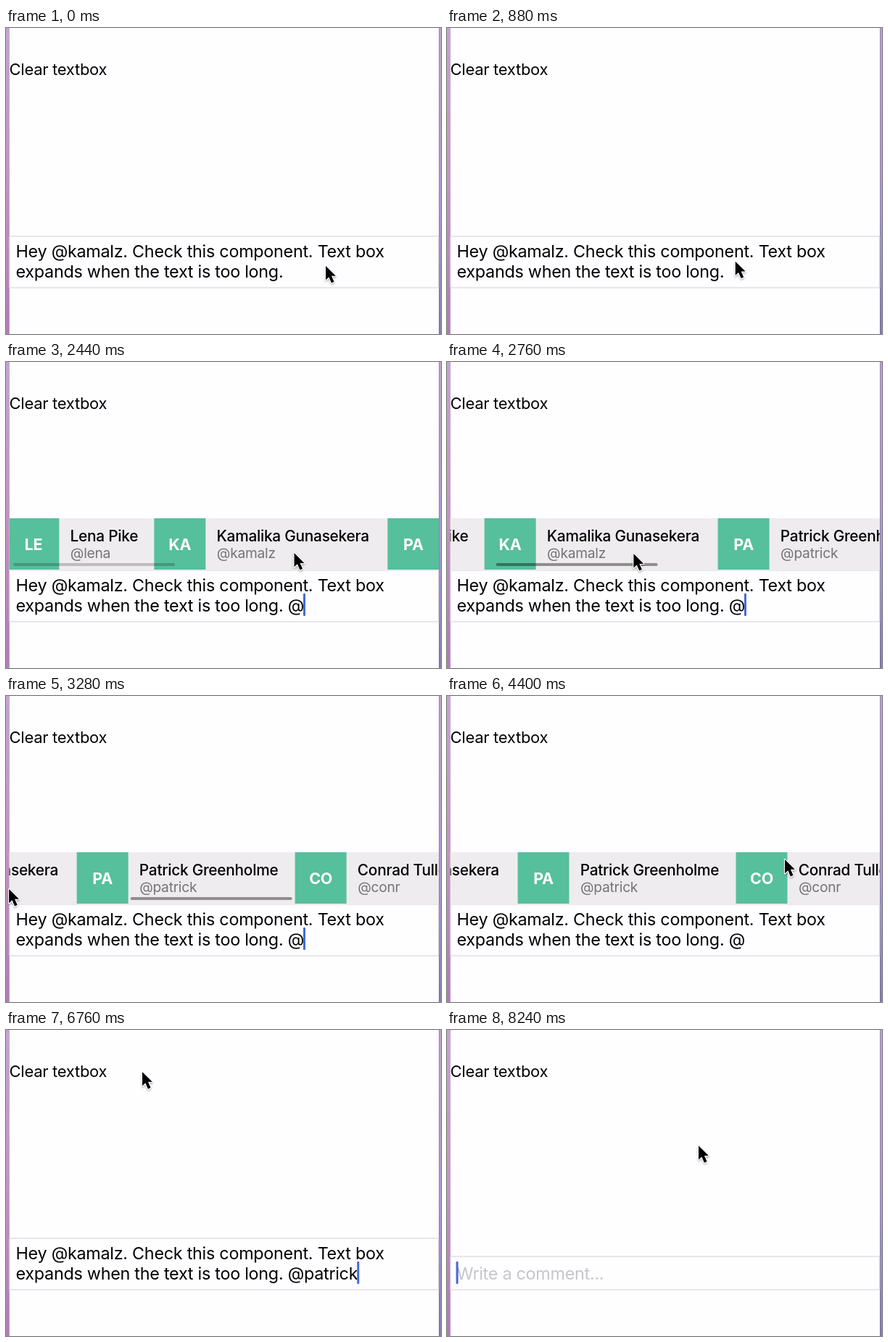
Write an HTML page that moves like this. It is 600 px wide and 423 px high and loops after 8280 ms.

```html
<!DOCTYPE html>
<html lang="en">
<head>
<meta charset="utf-8">
<title>Mention suggestions</title>
<style>
html, body { margin: 0; width: 100%; height: 100%; overflow: hidden; background: #fefdff; }
svg { display: block; width: 600px; height: 423px; }
text { font-family: Inter, "Open Sans", sans-serif; letter-spacing: -.24px; white-space: pre; }
.label { font-size: 21.9px; }
.input { font-size: 23.3px; }
.name { font-size: 20.8px; font-weight: 500; }
.handle { font-size: 19.2px; fill: #747376; }
.initials { font-size: 21.5px; font-weight: 700; fill: #fff; text-anchor: middle; }
</style>
</head>
<body>
<svg viewBox="0 0 600 423">
  <defs>
    <linearGradient id="left" x2="0" y2="1">
      <stop stop-color="#c3a3d0"/><stop offset=".5" stop-color="#c394be"/><stop offset="1" stop-color="#b07cb4"/>
    </linearGradient>
    <linearGradient id="right" x2="0" y2="1">
      <stop stop-color="#bda0d0"/><stop offset=".6" stop-color="#a998ca"/><stop offset="1" stop-color="#857ab4"/>
    </linearGradient>
    <clipPath id="window"><rect id="windowRect" x="4.6" width="592.4"/></clipPath>
    <filter id="shadow" x="-50%" y="-50%" width="200%" height="200%">
      <feDropShadow dx="0" dy="1.5" stdDeviation="1.2" flood-opacity=".35"/>
    </filter>
  </defs>
  <rect width="600" height="423" fill="#fefdff"/>
  <rect width="4.6" height="423" fill="url(#left)"/>
  <rect x="4" width=".6" height="423" fill="#8d7697" opacity=".4"/>
  <rect x="597" width="3" height="423" fill="url(#right)"/>
  <rect x="597" width="1" height="423" fill="#6d6390" opacity=".4"/>
  <text class="label" x="4.6" y="65">Clear textbox</text>
  <path id="box" fill="none" stroke="#e2e0e4" stroke-width="1.4"/>
  <text class="input" id="line1" x="13.5" y="316.5"></text>
  <text class="input" id="line2" x="13.5" y="345"></text>
  <rect id="caret" y="320" width="3" height="31" rx="1" fill="#4169d8"/>
  <g clip-path="url(#window)">
    <g id="panel">
      <rect x="4" y="216" width="593" height="72" fill="#eeecee"/>
      <g id="items"></g>
      <rect id="bar" y="278" width="223" height="4" rx="2" fill="#000"/>
    </g>
  </g>
  <path id="cursor" d="M0 0V21.5L4.8 17L8.8 26L12.8 24.2L8.8 15.4H15.4Z" stroke="#fff" stroke-width="2.4"
    stroke-linejoin="round" paint-order="stroke" filter="url(#shadow)"/>
</svg>
<script>
const LOOP = 8280;
const $ = id => document.getElementById(id);
const set = (id, attrs) => { for (const k in attrs) $(id).setAttribute(k, attrs[k]); };
const ramp = (t, from, to) => Math.min(1, Math.max(0, (t - from) / (to - from)));
const smooth = u => u * u * (3 - 2 * u);

const people = [
  [5, 'LE', 'Lena Pike', '@lena'],
  [207, 'KA', 'Kamalika Gunasekera', '@kamalz'],
  [529, 'PA', 'Patrick Greenholme', '@patrick'],
  [830, 'CO', 'Conrad Tulley', '@conr']
];
$('items').innerHTML = people.map(([x, initials, name, handle]) => `
  <g transform="translate(${x} 0)">
    <rect y="216" width="71" height="71" fill="#56bf9c"/>
    <text class="initials" x="35.5" y="260">${initials}</text>
    <text class="name" x="86.2" y="248">${name}</text>
    <text class="handle" x="86.5" y="271">${handle}</text>
  </g>`).join('');

// time, x, y of the pointer tip
const path = [
  [0, 441, 329], [500, 441, 329], [1100, 379, 320], [1700, 379, 320],
  [2300, 400, 264], [2400, 400, 264], [3290, 4, 267], [3500, 4, 267],
  [4150, 440, 262], [4400, 466, 226], [4700, 440, 235], [5200, 290, 250],
  [5650, 290, 250], [6400, 188, 58], [6760, 188, 58], [7050, 100, 54],
  [7550, 100, 54], [8150, 347, 160], [LOOP, 347, 160]
];
function pointer(t) {
  const i = path.findIndex(p => p[0] > t);
  const [t0, x0, y0] = path[i - 1], [t1, x1, y1] = path[i];
  const u = smooth(ramp(t, t0, t1));
  return [x0 + (x1 - x0) * u, y0 + (y1 - y0) * u];
}

const FOCUS = 500, SPACE = 1080, MENTION = 1320, PICK = 5400, CLEAR = 7280;

function draw(t) {
  const empty = t >= CLEAR;
  const tail = t < SPACE ? '' : t < MENTION ? ' ' : t < PICK ? ' @' : ' @patrick';
  const line2 = $('line2');
  $('line1').textContent = empty ? '' : 'Hey @kamalz. Check this component. Text box';
  line2.textContent = empty ? 'Write a comment...' : 'expands when the text is too long.' + tail;
  line2.setAttribute('fill', empty ? '#c6c5c9' : '#000');
  set('box', { d: `M5 ${empty ? 313 : 288}H596.5V359H5Z` });

  const blink = ((t - 2740) % 900 + 900) % 900 < 640;
  set('caret', {
    x: 12.5 + (empty ? 0 : line2.getComputedTextLength()),
    opacity: t >= FOCUS && blink ? 1 : 0
  });

  const open = ramp(t, MENTION, MENTION + 100) - ramp(t, PICK, PICK + 100);
  const scroll = 431.5 * smooth(ramp(t, 2400, 3290));
  set('windowRect', { y: 288 - 72 * open, height: 72 * open });
  set('panel', { transform: `translate(0 ${72 * (1 - open)})` });
  set('items', { transform: `translate(${-scroll} 0)` });
  set('bar', {
    x: 9 + scroll * .377,
    opacity: .4 * (ramp(t, 2400, 2480) - ramp(t, 3650, 3950))
  });

  set('cursor', { transform: `translate(${pointer(t)}) scale(.9)` });
}

const start = performance.now();
function frame() {
  draw((performance.now() - start) % LOOP);
  requestAnimationFrame(frame);
}
frame();
</script>
</body>
</html>
```
